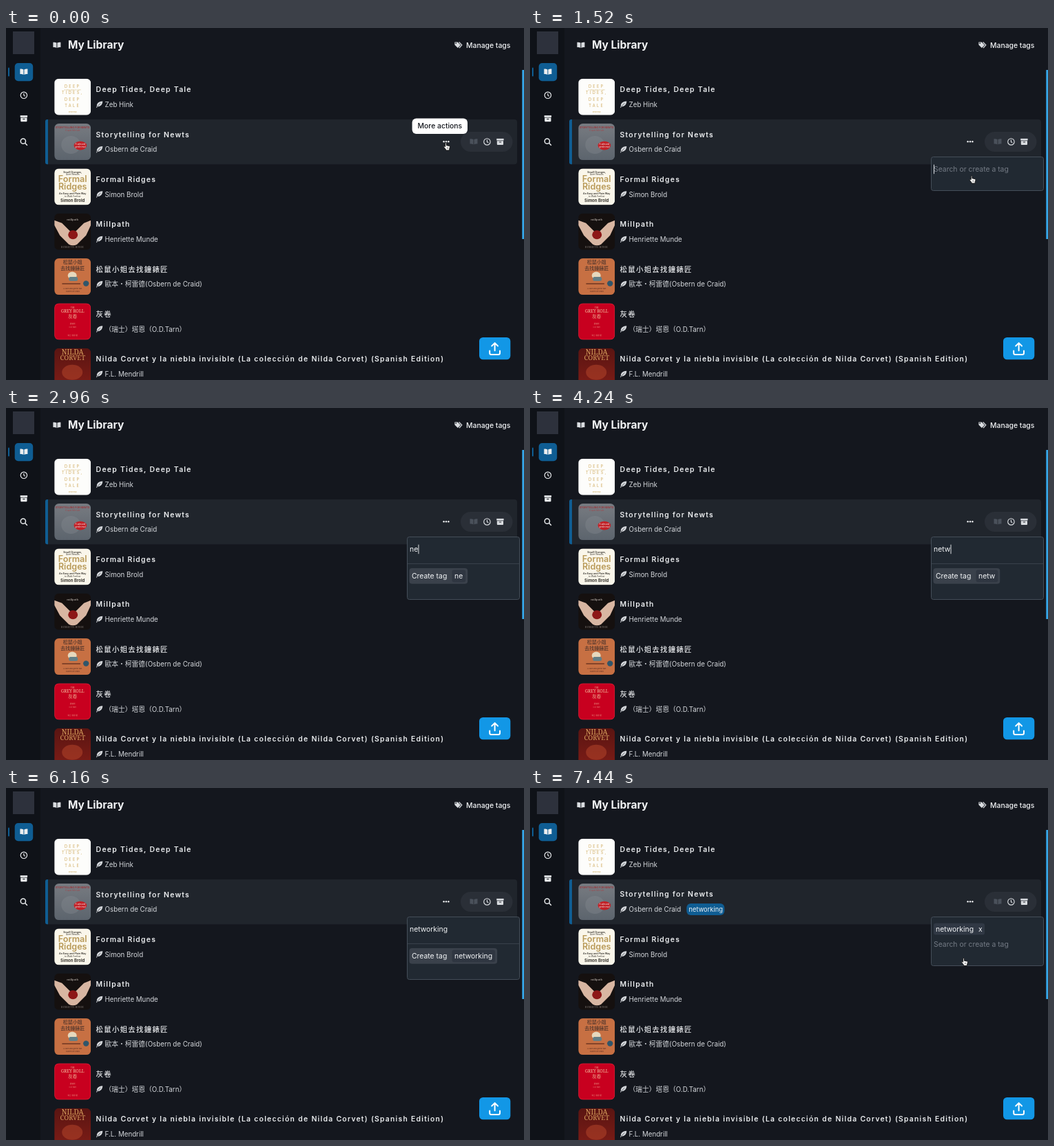
These frames come from a looping animation (752x512 px, 7.52 s). An HTML page:

```html
<!DOCTYPE html>
<html lang="zh-Hant">
<head>
<meta charset="utf-8">
<title>My Library</title>
<style>
  html, body { margin: 0; width: 100%; height: 100%; overflow: hidden; background: #14171e; }
  svg { display: block; width: 752px; height: 512px; }
  text { font: 400 10.4px Inter, "Noto Sans CJK TC", "Noto Sans CJK JP", "Noto Sans CJK", sans-serif; fill: #f2f4f6; white-space: pre; }
  .title { font-weight: 500; letter-spacing: 1.3px; stroke: #f2f4f6; stroke-width: .15px; }
  .author { font-size: 9.75px; fill: #d5d8dc; }
  .head { font-size: 15.5px; font-weight: 700; }
  .medium { font-weight: 500; }
  .hint { fill: #737a84; }
  .serif { font-family: "Noto Serif", "Liberation Serif", "Noto Sans CJK TC", serif; }
</style>
</head>
<body>
<svg id="stage" viewBox="0 0 752 512">
  <defs>
    <clipPath id="cover"><rect width="53" height="53" rx="6.5"/></clipPath>
    <linearGradient id="slate" x2="0" y2="1"><stop stop-color="#777b81"/><stop offset="1" stop-color="#5c646d"/></linearGradient>
    <linearGradient id="ember" x2="0" y2="1"><stop stop-color="#5a1512"/><stop offset="1" stop-color="#7c1c16"/></linearGradient>
    <g id="book"><path d="M-.5-3.3C-1.8-4.1-3.7-4.3-5.5-4.2V3.2C-3.7 3.1-1.8 3.4-.5 4.2ZM.5-3.3C1.8-4.1 3.7-4.3 5.5-4.2V3.2C3.7 3.1 1.8 3.4.5 4.2Z"/></g>
    <g id="clock" fill="none" stroke="currentColor" stroke-width="1.15"><circle r="4.7"/><path d="M0-2.8V.2L1.9 1.4"/></g>
    <g id="archive"><path d="M-5.2-4.5H5.2V-1.9H-5.2Z"/><path d="M-4.6-1.1H4.6V3.6Q4.6 4.5 3.7 4.5H-3.7Q-4.6 4.5-4.6 3.6ZM-1.6.2V1.2H1.6V.2Z" fill-rule="evenodd"/></g>
    <g id="search" fill="none" stroke="currentColor" stroke-width="1.5"><circle cx="-1" cy="-1" r="3.6"/><path d="M1.6 1.6L5 5"/></g>
    <g id="feather"><path d="M-4.6 4.6L-3.7 2.4C-4.3-1.6 0-4.7 4.6-4.6C4.8-1.4 2.8 2.7-1.6 3.1L-2.8 3.2L-3.9 4.9Z"/><path d="M-3.4 3.2L1.8-1.8" stroke="#14171e" stroke-width=".6"/></g>
    <g id="tags"><path d="M-5.4-4.4H-1.2L3.2 0L-.9 4.2L-5.4-.3ZM-3.6-3.5A.8.8 0 1 0-3.5-3.5Z" fill-rule="evenodd"/><path d="M.8-4.3L5 0L1.2 4.2" fill="none" stroke="currentColor" stroke-width="1.2"/></g>
    <g id="hand"><path d="M-2.3-5.2Q-1.3-6-.6-5V-1.8L3.6-.9Q4.6-.5 4.4.8L3.6 3.9V5.4H-1.5V4.2L-4.3.7Q-4.4-.7-3.2-.5L-2.3.3Z" fill="#fff" stroke="#111" stroke-width=".9"/><path d="M.3.8V3.4M1.7.8V3.4" stroke="#333" stroke-width=".5"/></g>
    <g id="upload" fill="none" stroke="#fff" stroke-width="2" stroke-linecap="round" stroke-linejoin="round"><path d="M0 3V-7.5M-4.4-3.8L0-8.2L4.4-3.8M-7.4 3.2V6.4Q-7.4 8.6-5.2 8.6H5.2Q7.4 8.6 7.4 6.4V3.2"/></g>
  </defs>
  <g id="page"></g>
  <g id="live"></g>
</svg>
<script>
const LOOP = 7520, STEP = 80;
const BLUE = '#0f5d93', PANEL = '#212932';
const $ = id => document.getElementById(id);
const pen = document.createElement('canvas').getContext('2d');
pen.font = '400 10.4px Inter, sans-serif';
const widthOf = s => pen.measureText(s).width;

const text = (x, y, s, cls = '', more = '') => `<text x="${x}" y="${y}" class="${cls}" ${more}>${s}</text>`;
const rect = (x, y, w, h, fill, r = 0, more = '') =>
  `<rect x="${x}" y="${y}" width="${w}" height="${h}" rx="${r}" fill="${fill}" ${more}/>`;
const icon = (id, x, y, color = '#eceef0') =>
  `<use href="#${id}" transform="translate(${x} ${y})" fill="${color}" color="${color}"/>`;
const oval = (x, y, rx, ry, fill, more = '') =>
  `<ellipse cx="${x}" cy="${y}" rx="${rx}" ry="${ry}" fill="${fill}" ${more}/>`;
// Centred cover lettering
const label = (y, s, size, fill, more = '', cls = '') =>
  text(26.5, y, s, cls, `text-anchor="middle" style="font-size:${size}px;fill:${fill};${more}"`);
const back = fill => rect(0, 0, 53, 53, fill);

const covers = [
  () => back('#fdfdfb')
    + ['DEEP', 'TIDES,', 'DEEP', 'TALE'].map((s, i) =>
        label(13.3 + i * 9.3, s, 5.6, '#cfa85a', 'letter-spacing:2.3px')).join('')
    + label(17.5, 'a small guide to calm', 2.4, '#d8bf83')
    + label(49.3, 'ZEB HINK', 2.6, '#c9a24c'),
  () => back('url(#slate)')
    + label(7.2, 'STORYTELLING FOR NEWTS', 3.6, '#9d3237', 'font-weight:600')
    + label(11.2, 'A quiet little tale', 2.8, '#a3474b')
    + oval(24, 31, 14, 13, '#878d93', 'opacity=".35"')
    + oval(37.7, 32, 9.3, 6.4, '#c22127')
    + text(37.7, 31.4, 'A calm and', '', 'text-anchor="middle" style="font-size:2.8px"')
    + text(37.7, 35, 'gentle read', '', 'text-anchor="middle" style="font-size:2.8px"'),
  () => back('#faf6ea')
    + label(6.2, 'Small Changes,', 3.6, '#37342e', 'font-weight:600')
    + label(9.8, 'Quiet Results', 3.2, '#37342e')
    + label(20, 'Formal', 12.6, '#b99a58', 'font-weight:600')
    + label(30.4, 'Ridges', 12.6, '#b99a58', 'font-weight:600')
    + label(37.6, 'An Easy and Plain Way', 3.6, '#37342e', 'font-weight:600')
    + label(41.6, 'to Walk Further', 3.3, '#37342e')
    + label(48.8, 'Simon Brold', 6, '#37342e', 'font-weight:700'),
  () => back('#15100f')
    + label(10, 'millpath', 4.2, '#c9c2ba', '', 'serif')
    + '<path d="M0 10L11 14L24 27H30L43 14L53 10V17L46 32L33 45Q27 48 21 45L8 32L0 17Z" fill="#d8b6a2"/>'
    + oval(27, 31, 7, 6.5, '#8d1717')
    + label(50, 'HENRIETTE MUNDE', 2.8, '#8b827c', 'letter-spacing:.4px', 'serif'),
  () => back('#c77043')
    + label(8.4, '松鼠小姐', 7, '#392a28', 'font-weight:500')
    + label(16.6, '去找鐘錶匠', 7, '#392a28', 'font-weight:500')
    + oval(26, 25, 6.5, 5.5, '#e6d8bd')
    + rect(21, 27, 13, 6, '#637f86', 2.5)
    + rect(11, 36, 27, 2, '#844329', 1)
    + oval(46, 36.5, 4.2, 4.2, '#31566a')
    + label(44.5, 'A calm and gentle tale', 2.6, '#5b2d22')
    + label(49, 'Osbern de Craid', 2.6, '#5b2d22'),
  () => back('#c8001f')
    + rect(.4, .4, 52.2, 52.2, 'none', 6, 'stroke="#dc3044" stroke-width=".7"')
    + label(8, 'THE', 2.6, '#f0b99a', '', 'serif')
    + label(14, 'GREY ROLL', 6.2, '#f3c4a2', '', 'serif')
    + label(21.5, '灰卷', 6.4, '#eeb291', '', 'serif')
    + label(31, '讀者版', 2.6, '#e88f80')
    + label(36, 'O.D.Tarn', 2.6, '#e88f80')
    + label(47.5, '瑞士 塔恩 著', 2.6, '#e88f80'),
  () => back('url(#ember)')
    + label(8.8, 'NILDA', 10, '#d9a35f', '', 'serif')
    + label(17.6, 'CORVET', 9.4, '#d9a35f', '', 'serif')
    + oval(26, 35, 15, 11, '#b3442a', 'opacity=".55"')
];

const books = [
  ['Deep Tides, Deep Tale', 'Zeb Hink'],
  ['Storytelling for Newts', 'Osbern de Craid'],
  ['Formal Ridges', 'Simon Brold'],
  ['Millpath', 'Henriette Munde'],
  ['松鼠小姐去找鐘錶匠', '歐本・柯雷德(Osbern de Craid)'],
  ['灰卷', '（瑞士）塔恩（O.D.Tarn）'],
  ['Nilda Corvet y la niebla invisible (La colección de Nilda Corvet) (Spanish Edition)', 'F.L. Mendrill']
];

function bookRow([title, author], i) {
  const y = 73.7 + i * 65.35;
  return `<g transform="translate(70.2 ${y})"><g clip-path="url(#cover)">${covers[i]()}</g></g>`
    + text(130.6, y + 19.5, title, 'title', `id="title${i}"`)
    + icon('feather', 135.6, y + 37.5, '#d5d8dc')
    + text(143.6, y + 41.3, author, 'author');
}

$('page').innerHTML =
  rect(0, 0, 752, 512, '#14171e') + rect(0, 0, 50, 512, '#0f1218')
  + rect(10, 5, 31, 33, '#2d313c')
  + rect(3, 57.5, 2, 13, BLUE, 1) + rect(12.7, 51, 26.5, 26.3, BLUE, 5)
  + icon('book', 25.9, 63.8) + icon('clock', 25.9, 97.8) + icon('archive', 25.9, 131.7) + icon('search', 25.9, 165.7)
  + icon('book', 73.9, 24.9, '#d9dce0') + text(90, 30.4, 'My Library', 'head')
  + icon('tags', 656.8, 24.8, '#d9dce0') + text(668, 28.6, 'Manage tags', 'medium')
  + rect(57, 133, 685, 65.3, '#20252c', 4)
  + `<path d="M61 133H60Q57 133 57 136V195Q57 198.3 60 198.3H61Z" fill="${BLUE}"/>`
  + books.map(bookRow).join('')
  + [635.6, 639, 642.4].map(x => oval(x, 165.2, 1.2, 1.2, '#eceef0')).join('')
  + rect(660, 151, 75.5, 29, '#2a2f37', 14.5)
  + icon('book', 679, 165.4, '#4a515b') + icon('clock', 698.4, 165.4, '#d9dce0') + icon('archive', 717.4, 165.4, '#d9dce0')
  + rect(749.3, 61, 2.7, 246, '#36a8ea')
  + rect(687, 450, 45.3, 32.3, '#1297e6', 5.5) + icon('upload', 709.6, 466.3);

const MENU = 320, SEARCH = 1360, TAGGED = 6880;
const word = 'networking';
const keys = [2640, 2880, 3360, 3920, 4320, 4640, 4880, 5120, 5360, 5600];
const path = [[0, 640, 172.5], [320, 640, 172.5], [800, 642.5, 220.5], [6240, 642.5, 220.5],
  [6720, 629, 247], [6960, 629, 247], [7200, 631, 253]];

function cursor(t) {
  if (t >= keys[0] && t < 6240) return '';
  let i = path.findIndex(p => p[0] > t);
  if (i < 0) i = path.length;
  const a = path[i - 1], b = path[i] || a;
  const p = b === a ? 0 : (t - a[0]) / (b[0] - a[0]), e = p * p * (3 - 2 * p);
  return icon('hand', a[1] + (b[1] - a[1]) * e, a[2] + (b[2] - a[2]) * e);
}

const panel = h => rect(582.5, 187.5, 163, h, PANEL, 3, 'stroke="#454e59"');
const caret = (x, y, age) => age % 1000 < 500 ? rect(x, y - 10.3, .9, 13.5, '#f2f4f6') : '';

function popup(t) {
  if (t < MENU) return rect(589.6, 131.4, 80.4, 22.6, '#fff', 6)
    + text(597.6, 146.4, 'More actions', 'medium', 'style="fill:#15181f"');
  if (t < SEARCH) return panel(64.5)
    + (t >= 640 ? rect(583, 197.5, 162, 22.3, '#2a313a') : '')
    + text(596, 212, 'Add new tag') + text(596, 234.3, 'Delete this book', '', 'style="fill:#8f1c20"');
  if (t >= TAGGED) return panel(71)
    + rect(586, 196.8, 74, 16.6, '#303844', 3) + text(589, 209, 'networking') + text(651, 209, 'x')
    + text(586, 231.2, 'Search or create a tag', 'hint') + caret(586, 231.2, t - TAGGED)
    + rect(227.3, 168, 55, 17, BLUE, 6) + text(230.6, 180.2, 'networking', '', 'style="font-size:9.3px"');
  const n = keys.filter(k => k <= t).length;
  if (!n) return panel(49) + text(586, 209, 'Search or create a tag', 'hint') + caret(586, 209, t - SEARCH);
  const typed = word.slice(0, n), w = widthOf(typed);
  return panel(91) + text(586, 209, typed) + caret(586.3 + w, 209, t - keys[n - 1])
    + rect(583, 226, 162, 1, '#38414b')
    + rect(585.5, 233, 72.5 + w, 22.7, '#3a414b', 4) + rect(647.5, 235.5, w + 7.5, 17.7, '#2f3641', 3)
    + text(589, 248.2, 'Create tag') + text(651, 248.2, typed);
}

let shown = -1;
function frame() {
  const t = Math.floor(performance.now() % LOOP / STEP) * STEP;
  if (t !== shown) {
    shown = t;
    $('live').innerHTML = popup(t) + cursor(t);
    $('title1').setAttribute('transform', `translate(0 ${t >= TAGGED ? -1 : 0})`);
  }
  requestAnimationFrame(frame);
}
frame();
</script>
</body>
</html>
```
